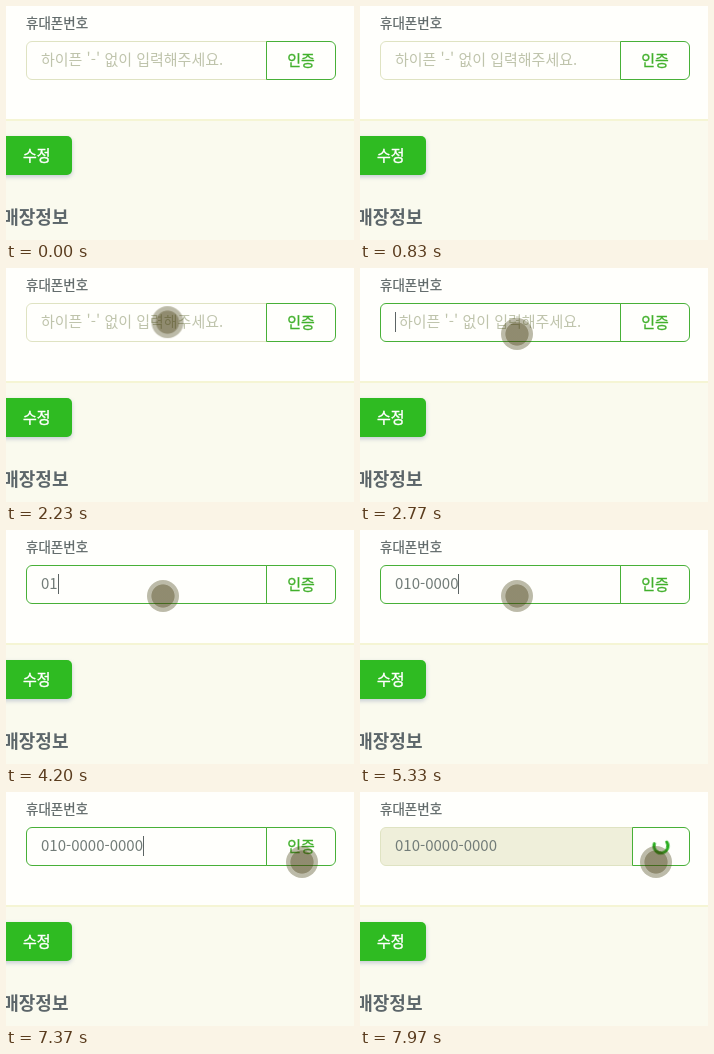
Write an HTML page that moves like this. It is 348 px wide and 234 px high and loops after 8 s.

```html
<!DOCTYPE html>
<html lang="ko">
<head>
<meta charset="utf-8">
<title>휴대폰번호 인증</title>
<style>
html, body { margin: 0; width: 100%; height: 100%; overflow: hidden; }
body {
  position: relative; background: #fafaee;
  font: 15px/22px "Noto Sans CJK KR", "Noto Sans CJK", "Noto Sans", sans-serif;
}
body * { position: absolute; box-sizing: border-box; white-space: nowrap; }

.card { left: 0; top: 0; width: 100%; height: 115px; background: #fffffc; border-bottom: 2px solid #f5f5d4; }
.label { left: 20px; top: 5px; font-size: 13.5px; color: #5f6868; -webkit-text-stroke: .25px; }
.title { right: calc(100% - 62.5px); top: 199px; font-size: 18px; font-weight: 700; color: #5c666a; }
.edit {
  left: -10px; top: 130px; width: 76px; height: 39px; padding-left: 27px;
  border-radius: 5px; background: #2fbb22; box-shadow: 0 2px 4px #7a8ab066;
  color: #fff; line-height: 37px; -webkit-text-stroke: .4px;
}

.field {
  left: 20px; top: 35px; width: 242px; height: 39px;
  border: 1px solid #dfe3c2; border-radius: 6px 0 0 6px; background: #fffffc;
  animation: field 8s infinite;
}
.verify {
  left: 260px; top: 35px; width: 70px; height: 39px;
  border: 1px solid #48b037; border-radius: 0 6px 6px 0; background: #fffffc;
  animation: verify 8s step-end infinite;
}
.verify span {
  left: 0; width: 100%; line-height: 35px; text-align: center;
  color: #42b02c; -webkit-text-stroke: .3px; animation: idle 8s step-end infinite;
}

.hint { left: 35px; top: 42px; color: #bfc4ac; animation: hint 8s step-end infinite; }
.typed { left: 35px; top: 42px; height: 22px; width: 0; overflow: hidden; color: #727c78; animation: type 8s step-end infinite; }
.caret {
  left: 35px; top: 44px; width: 0; height: 20px;
  border-right: 1px solid #5c6464; box-sizing: content-box;
  animation: type 8s step-end infinite, blink 8s step-end infinite;
}

.spinner { left: 291px; top: 44px; width: 20px; height: 20px; opacity: 0; animation: busy 8s step-end infinite, spin 1s linear infinite; }
.pointer {
  left: -16px; top: -16px; width: 32px; height: 32px; border-radius: 50%;
  background: radial-gradient(circle, #40380a94 11.2px, #4642145c 12px);
  animation: move 8s infinite;
}

@keyframes field {
  0%, 32.4% { width: 242px; border-color: #dfe3c2; background: #fffffc; }
  32.5%, 93.7% { width: 242px; border-color: #48b037; background: #fffffc; }
  93.75% { width: 253px; border-color: #dfe3c2; background: #fffffc; }
  96.2%, 100% { width: 253px; border-color: #dfe3c2; background: #efefda; }
}
@keyframes verify {
  0% { left: 260px; width: 70px; }
  93.75%, 100% { left: 272px; width: 58px; }
}
@keyframes idle { 0% { opacity: 1; } 93.75%, 100% { opacity: 0; } }
@keyframes busy { 0% { opacity: 0; } 93.75%, 100% { opacity: 1; } }
@keyframes spin { to { transform: rotate(360deg); } }
@keyframes hint {
  0% { transform: none; opacity: 1; }
  32.5% { transform: translateX(4px); opacity: 1; }
  50.3%, 100% { opacity: 0; }
}
/* digit = .555em, hyphen = .347em */
@keyframes type {
  0% { width: 0; }
  50.3% { width: .555em; }
  52.4% { width: 1.11em; }
  55% { width: 1.665em; }
  58.75% { width: 2.567em; }
  61.6% { width: 3.122em; }
  64.1% { width: 3.677em; }
  66.5% { width: 4.232em; }
  68.75% { width: 5.134em; }
  70.8% { width: 5.689em; }
  72.8% { width: 6.244em; }
  74.1%, 100% { width: 6.81em; }
}
@keyframes blink {
  0% { opacity: 0; }
  32.5% { opacity: 1; }
  39.1% { opacity: 0; }
  45.4% { opacity: 1; }
  80.4% { opacity: 0; }
  86.6% { opacity: 1; }
  92.9%, 100% { opacity: 0; }
}
@keyframes move {
  0%, 21.2% { transform: translate(190px, -20px); animation-timing-function: ease-out; }
  30.9%, 80% { transform: translate(157px, 66px); animation-timing-function: ease-in; }
  84.6% { transform: translate(225px, 70px); animation-timing-function: ease-out; }
  89.5%, 100% { transform: translate(296px, 70px); }
}
</style>
</head>
<body>
<div class="card"></div>
<div class="label">휴대폰번호</div>
<div class="field"></div>
<div class="hint">하이픈 '-' 없이 입력해주세요.</div>
<div class="typed">010-0000-0000</div>
<div class="caret"></div>
<div class="verify"><span>인증</span></div>
<svg class="spinner" viewBox="-10 -10 20 20">
  <path d="M6.4-2.8A7 7 0 1 1-6.1-3.4" fill="none" stroke="#2cae22" stroke-width="3" stroke-linecap="round"/>
</svg>
<div class="edit">수정</div>
<div class="title">매장정보</div>
<div class="pointer"></div>
</body>
</html>
```
